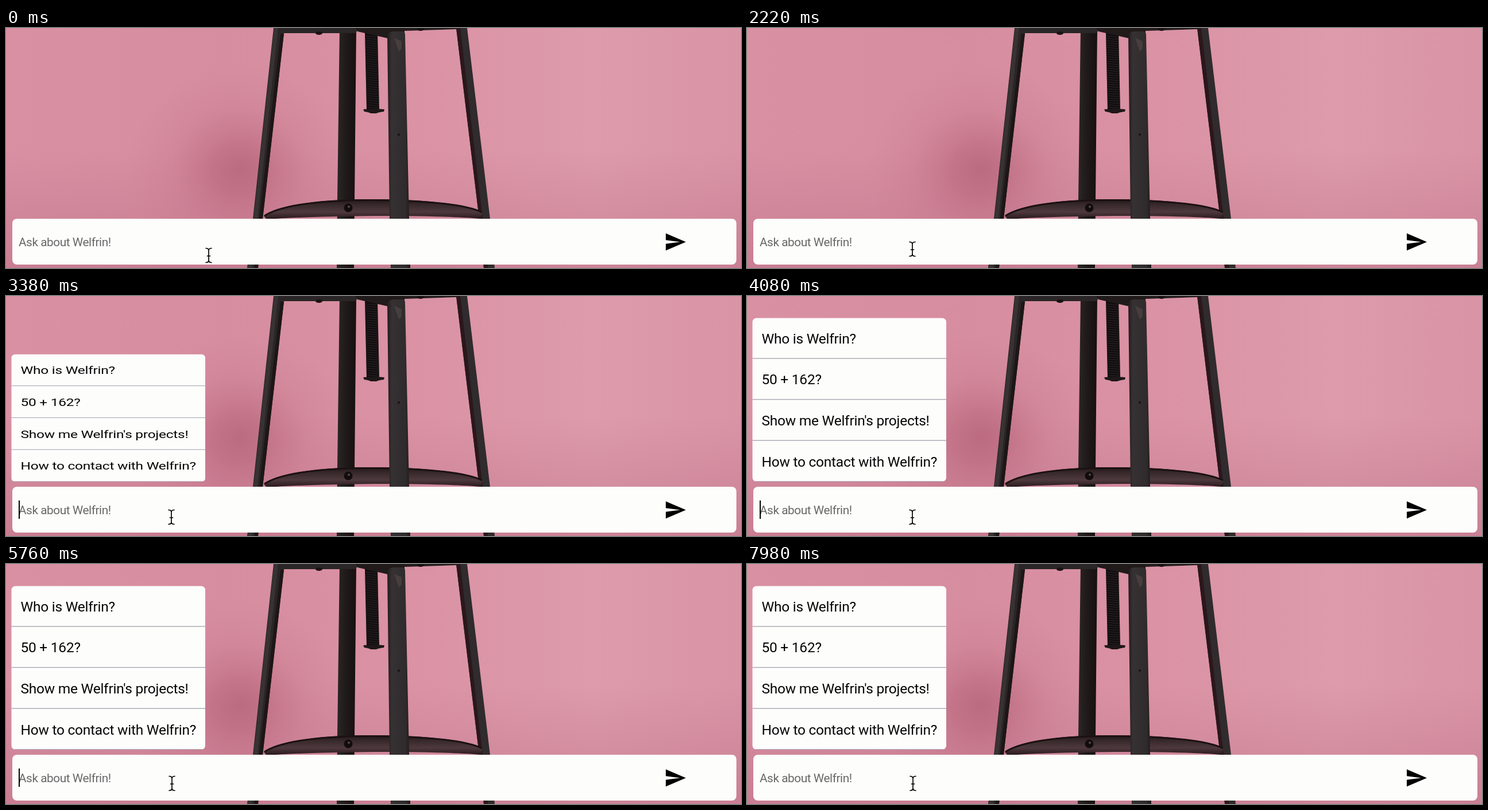
Write an HTML page that moves like this. It is 1280 by 419 pixels and loops after 8000 ms.

```html
<!DOCTYPE html>
<html lang="en">
<head>
<meta charset="utf-8">
<title>Ask box</title>
<style>
  html, body { margin: 0; width: 100%; height: 100%; overflow: hidden; background: #d790a2; }
  svg { display: block; width: 100vw; height: 100vh; }
  text { font-family: Roboto, Lato, sans-serif; }
  .hint { font-size: 20.8px; letter-spacing: -.45px; fill: #686868; }
  .item { font-size: 24.5px; letter-spacing: -.25px; fill: #060606; }
</style>
</head>
<body>
<svg viewBox="0 0 1280 419" preserveAspectRatio="none">
  <defs>
    <linearGradient id="wall">
      <stop offset="0" stop-color="#d990a3"/>
      <stop offset=".3" stop-color="#d78da0"/>
      <stop offset=".55" stop-color="#da92a4"/>
      <stop offset=".8" stop-color="#dd9bab"/>
      <stop offset="1" stop-color="#d994a6"/>
    </linearGradient>
    <linearGradient id="floor" x2="0" y2="1">
      <stop offset=".5" stop-color="#b96c83" stop-opacity="0"/>
      <stop offset="1" stop-color="#b2647b" stop-opacity=".42"/>
    </linearGradient>
    <radialGradient id="shade">
      <stop offset="0" stop-color="#a9536a" stop-opacity=".58"/>
      <stop offset=".25" stop-color="#ad576e" stop-opacity=".44"/>
      <stop offset=".6" stop-color="#b6647b" stop-opacity=".16"/>
      <stop offset="1" stop-color="#bd6c82" stop-opacity="0"/>
    </radialGradient>
    <linearGradient id="steel">
      <stop offset="0" stop-color="#241a1c"/>
      <stop offset=".2" stop-color="#363233"/>
      <stop offset=".8" stop-color="#2f2b2c"/>
      <stop offset="1" stop-color="#1e1718"/>
    </linearGradient>
    <linearGradient id="back">
      <stop offset="0" stop-color="#2c2727"/>
      <stop offset=".4" stop-color="#211b1b"/>
      <stop offset="1" stop-color="#170f10"/>
    </linearGradient>
    <linearGradient id="ring" x2="0" y2="1">
      <stop offset="0" stop-color="#241819"/>
      <stop offset=".3" stop-color="#392a2c"/>
      <stop offset=".65" stop-color="#4e393d"/>
      <stop offset="1" stop-color="#2a1a1d"/>
    </linearGradient>
    <clipPath id="card"><rect x="9.5" y="38.5" width="337.5" height="285.5" rx="7"/></clipPath>
    <path id="ibeam" d="M-5 -12.5Q0 -12.5 0 -8.5Q0 -12.5 5 -12.5M0 -9V9M-5 12.5Q0 12.5 0 8.5Q0 12.5 5 12.5M-2.5 1H2.5"/>
  </defs>

  <rect width="1280" height="419" fill="url(#wall)"/>
  <rect width="1280" height="419" fill="url(#floor)"/>
  <ellipse cx="408" cy="246" rx="200" ry="180" fill="url(#shade)"/>

  <g id="stool">
    <path d="M581 0H610L607 300 606 419H576L577 300Z" fill="url(#back)"/>
    <path d="M466 0H612L610 9H484L447 333 439 419H420L430 333Z" fill="#2a2526"/>
    <path d="M467 0H474L438 333 429 419H421L431 333Z" fill="#383233"/>
    <path d="M478 10H484L447 333 439 419H433L441 333Z" fill="#1d1617"/>
    <path d="M784 0H803L843 333 851 419H832L824 333Z" fill="#302b2d"/>
    <path d="M784 0H791L830 333 839 419H832L824 333Z" fill="#2b171c"/>
    <path d="M694 0H784V2L694 5Z" fill="#241c1d"/>
    <path d="M625 8H647L650 143H628Z" fill="#120e0f"/>
    <path id="thread" fill="none" stroke="#2a2425" stroke-width="1.2"/>
    <path d="M622 142Q640 140 659 142L658 146Q649 147 645 149H635Q632 147 624 146Z" fill="#1e1718"/>
    <path d="M608 0H694V8L665 18 612 6Z" fill="#211a1b"/>
    <ellipse cx="545" cy="9" rx="6" ry="3" fill="#1a1213"/>
    <ellipse cx="722" cy="2" rx="6" ry="3" fill="#1a1213"/>
    <path d="M449 328C482 306 560 299 635 299C720 299 800 306 830 322L826 333C780 329 710 328 640 328C570 329 510 330 470 333H453Z" fill="url(#ring)"/>
    <path d="M450 328C482 307 560 300.500 635 300.500C720 300.500 800 307 829 322" fill="none" stroke="#1b1112" stroke-width="3"/>
    <circle cx="596" cy="314" r="7.500" fill="#120c0d"/>
    <circle cx="597" cy="312" r="2" fill="#54494b"/>
    <path d="M664 11Q668 6 676 6H691Q695 6 695 12L702 333 704 419H670L668 333Z" fill="url(#steel)"/>
    <path d="M676 17L689 23V36L684 41Z" fill="#594b48" opacity=".55"/>
    <circle cx="684" cy="186" r="2" fill="#161112"/>
  </g>

  <rect x="11" y="333" width="1261" height="80" rx="8" fill="#fdfdfc"/>
  <text class="hint" x="22" y="381">Ask about Welfrin!</text>
  <rect id="caret" x="22" y="357" width="2" height="32" fill="#000"/>
  <path d="M1149 388.5L1184 373.5 1149 358.5V370.2L1174 373.5 1149 376.8Z" fill="#000"/>

  <g id="menu"><g id="rows" clip-path="url(#card)">
    <rect x="9" y="38" width="339" height="287" fill="#fdfdfc"/>
  </g></g>

  <g id="beam" fill="none" stroke-linecap="round">
    <use href="#ibeam" stroke="#fff" stroke-width="3.5"/>
    <use href="#ibeam" stroke="#000" stroke-width="1.7"/>
  </g>
  <path id="arrow" d="M0 -1V22L5 17.5 9 26 13 24 9.3 16H16Z" fill="#000" stroke="#fff" stroke-width="1.6"/>
</svg>

<script>
const LOOP = 8000, OPEN = 3238, OPEN_MS = 300, BLINK = 840;
const ITEMS = ["Who is Welfrin?", "50 + 162?", "Show me Welfrin's projects!", "How to contact with Welfrin?"];
// time, x, y of the pointer
const PATH = [[0, 353, 397], [820, 307, 396], [1540, 288, 386], [4180, 288, 386], [4700, 289, 383], [LOOP, 289, 383]];
const ARROW = [420, 1200];

const $ = id => document.getElementById(id);

function add(parent, tag, attrs, text = "") {
  const el = document.createElementNS("http://www.w3.org/2000/svg", tag);
  for (const key in attrs) el.setAttribute(key, attrs[key]);
  el.textContent = text;
  parent.append(el);
}

ITEMS.forEach((label, i) => {
  const top = 38.5 + i * 71.6;
  add($("rows"), "text", { class: "item", x: 25.5, y: top + 44.3 }, label);
  add($("rows"), "rect", { x: 9, y: top + 69.8, width: 339, height: 1.4, fill: "#a8a8b2" });
});

let thread = "";
for (let y = 14; y < 141; y += 4) thread += `M${625 + y / 48} ${y}l22 2`;
$("thread").setAttribute("d", thread);

// cubic-bezier(.25, .1, .25, 1), solved by bisection
function ease(p) {
  if (p <= 0 || p >= 1) return Math.min(1, Math.max(0, p));
  const curve = (a, b, s) => 3 * a * s * (1 - s) ** 2 + 3 * b * s * s * (1 - s) + s ** 3;
  let lo = 0, hi = 1;
  for (let i = 0; i < 20; i++) {
    const mid = (lo + hi) / 2;
    if (curve(.25, .25, mid) < p) lo = mid; else hi = mid;
  }
  return curve(.1, 1, lo);
}

function pointer(t) {
  let i = 1;
  while (i < PATH.length - 1 && t > PATH[i][0]) i++;
  const [t0, x0, y0] = PATH[i - 1], [t1, x1, y1] = PATH[i];
  const p = (t - t0) / (t1 - t0), k = p * p * (3 - 2 * p);
  return [x0 + (x1 - x0) * k, y0 + (y1 - y0) * k];
}

// The picture rests for 100 ms at the end of every 840 ms
function held(t) {
  const phase = (t + 20) % 840;
  return phase > 740 && t > 820 ? t - (phase - 740) : t;
}

function show(el, on) { el.setAttribute("visibility", on ? "visible" : "hidden"); }

function draw(now) {
  const t = held(now % LOOP);
  const scale = ease((t - OPEN) / OPEN_MS);
  show($("menu"), scale > 0);
  $("menu").setAttribute("transform", `translate(0 ${324 * (1 - scale)}) scale(1 ${Math.max(scale, .001)})`);
  show($("caret"), t >= OPEN && (t - OPEN) % BLINK < BLINK / 2);

  const [x, y] = pointer(t), arrow = t >= ARROW[0] && t < ARROW[1];
  for (const id of ["beam", "arrow"]) $(id).setAttribute("transform", `translate(${x} ${y})`);
  show($("arrow"), arrow);
  show($("beam"), !arrow);
}

const start = performance.now();
function tick() {
  draw(performance.now() - start);
  requestAnimationFrame(tick);
}
tick();
</script>
</body>
</html>
```
